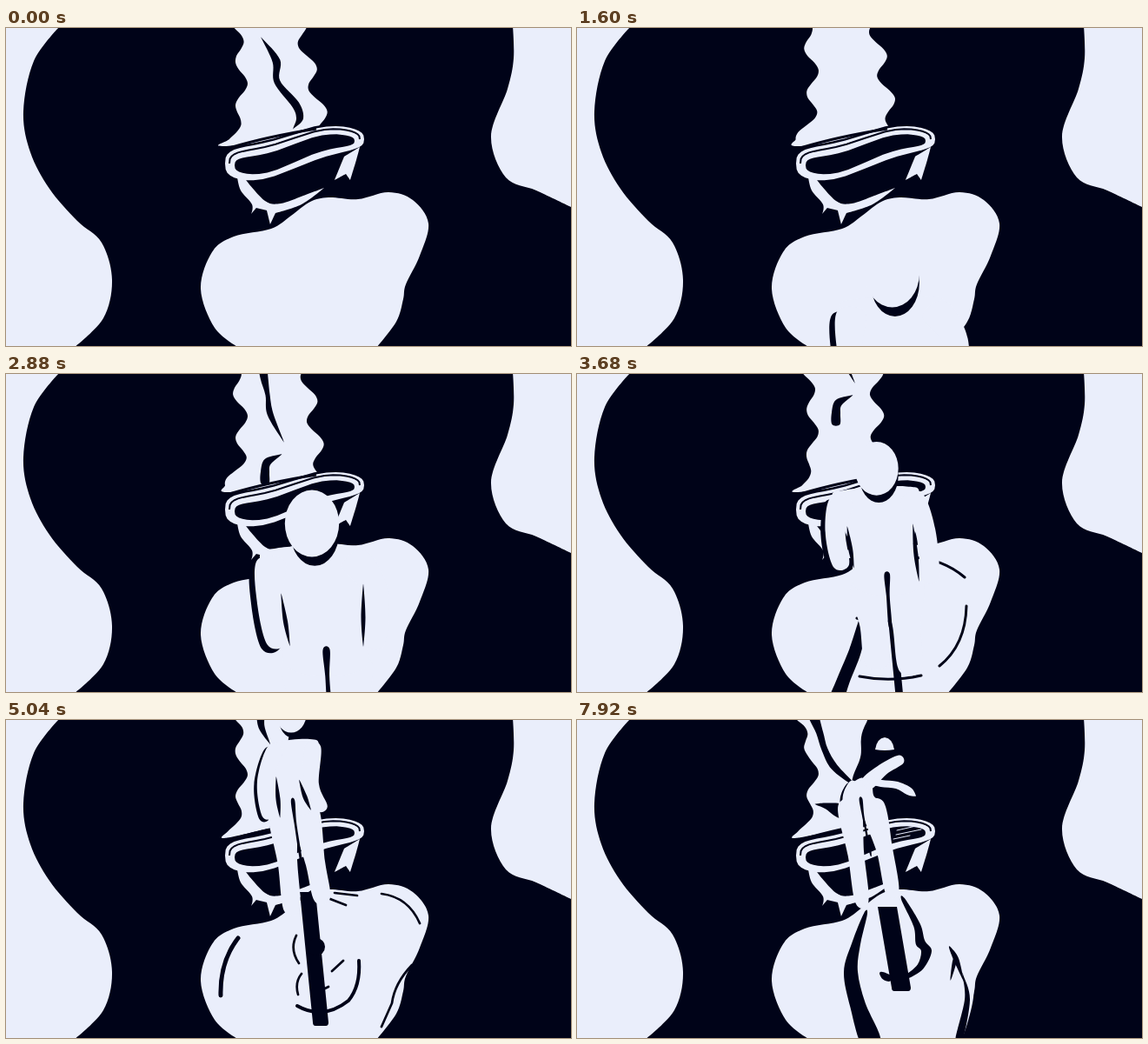
An HTML page that plays this animation: 650x366 px, repeating every 8 s.

```html
<!DOCTYPE html>
<html lang="en">
<head>
<meta charset="utf-8">
<title>Steam</title>
<style>
html, body { margin: 0; width: 100%; height: 100%; overflow: hidden; background: #eaeefb; }
svg { display: block; width: 650px; height: 366px; }
</style>
</head>
<body>
<svg id="stage" viewBox="0 0 650 366"></svg>
<script>
const LIGHT = '#eaeefb', DARK = '#000318';
const LOOP = 8000, STEP = 80, RISE = 0.085, TURN = 5520;
const stage = document.getElementById('stage');
const parts = [];

const clamp = v => Math.max(0, Math.min(1, v));
const mix = (a, b, u) => a + (b - a) * u;
const smooth = u => (u = clamp(u), u * u * (3 - 2 * u));
// "x,y" smooth point, "x,y!" corner, "x,y,w" point of a ribbon with its width
const parse = text => text.trim().split(/\s+/).map(p => {
  const point = p.split(',').map(parseFloat);
  point.corner = p.endsWith('!');
  return point;
});

// values between timed keys, held outside them
function track(keys) {
  return t => {
    const i = keys.findIndex(k => k[0] > t);
    if (i < 0) return keys[keys.length - 1][1];
    if (i === 0) return keys[0][1];
    const [[t0, a], [t1, b]] = [keys[i - 1], keys[i]];
    return a.map((v, j) => mix(v, b[j], (t - t0) / (t1 - t0)));
  };
}

function spline(pts) {
  const n = pts.length, at = i => pts[(i + n) % n], r = v => v.toFixed(1);
  const handle = (i, s) => {
    const k = at(i).corner ? 0 : s / 6, [a, b] = [at(i - 1), at(i + 1)];
    return `${r(at(i)[0] + k * (b[0] - a[0]))} ${r(at(i)[1] + k * (b[1] - a[1]))}`;
  };
  let d = `M${r(pts[0][0])} ${r(pts[0][1])}`;
  for (let i = 0; i < n; i++) {
    d += `C${handle(i, 1)} ${handle(i + 1, -1)} ${r(at(i + 1)[0])} ${r(at(i + 1)[1])}`;
  }
  return d + 'Z';
}

function ribbon(pts, dx = 0, dy = 0) {
  const side = s => pts.map(([x, y, w], i) => {
    const a = pts[Math.max(i - 1, 0)], b = pts[Math.min(i + 1, pts.length - 1)];
    const vx = b[0] - a[0], vy = b[1] - a[1], k = s * w / 2 / (Math.hypot(vx, vy) || 1);
    return [x + dx - vy * k, y + dy + vx * k];
  });
  return spline([...side(1), ...side(-1).reverse()]);
}

function oval(x, y, rx, ry) {
  return `M${x - rx} ${y}a${rx} ${ry} 0 1 0 ${2 * rx} 0a${rx} ${ry} 0 1 0 ${-2 * rx} 0Z`;
}

function add(attrs) {
  const el = document.createElementNS('http://www.w3.org/2000/svg', 'path');
  for (const k in attrs) el.setAttribute(k, attrs[k]);
  stage.append(el);
  return el;
}
const still = (fill, text) => add({ fill, d: spline(parse(text)) });
function shape(fill, path, from = 0, to = LOOP) {
  parts.push({ el: add({ fill }), path, from, to });
}
function lines(d, width, from, to, stroke = DARK) {
  parts.push({ el: add({ d, fill: 'none', stroke, 'stroke-width': width, 'stroke-linecap': 'round' }), from, to });
}
// dark ribbon that drifts up with the steam, or stays if speed is 0
function wisp(text, at, from, to = LOOP, speed = RISE) {
  const pts = parse(text);
  shape(DARK, t => ribbon(pts, 0, speed * (at - t)), from, to);
}

still(DARK, `62,-2! 32,38 20,96 28,143 50,185 82,222 110,247 122,290 112,334 78,368!
  652,368! 652,207! 610,187 575,172 558,125 577,70 584,35 583,-2!`);

// steam: two edges with a rising wave
const steamShape = track([
  [0, [264, 339, 365]], [2880, [264, 346, 362]], [4000, [264, 344, 340]],
  [4400, [262, 340, 312]], [5040, [264, 332, 305]], [5600, [258, 333, 308]], [6320, [252, 333, 310]]
]);
shape(LIGHT, t => {
  const now = Math.min(t, 6320), [left, top, bottom] = steamShape(now);
  const wave = (y, peak) => Math.cos((y - peak + 0.04 * now) * Math.PI / 25);
  const calm = mix(8, 2, smooth((now - 4000) / 1000));
  const a = [], b = [];
  for (let y = -8; y <= 136; y += 8) {
    a.push([mix(left, 271, clamp(y / 40)) + 7 * wave(y, 14) - 13 * smooth((y - 90) / 40), y]);
    b.push([mix(top, bottom, clamp(y / 110)) + calm * wave(y, 45), Math.min(y, 124)]);
  }
  return spline([...a, ...b.reverse()]);
});
wisp('295,13,1 311,38,9 312,62,7 333,88,9 338,104,8 331,115,1', 0, 0, 1360);
wisp('294,-20,10 297,4,9 301,24,5 304,46,7 318,75,1', 2880, 2080, 3900);
wisp('316,93,1 301,101,9 298,113,10 298,126,9', 2880, 2320, 3700);
wisp('293,-10,8 294,8,7 303,26,1', 5040, 4640, TURN);
wisp('270,-10,11 279,14,8 285,34,7 296,54,8 317,73,3', 0, TURN, LOOP, 0);
wisp('275,97,1 287,99,7 299,103,15 302,112,3', 0, 5760, LOOP, 0);

still(LIGHT, `268,368! 240,345 224,300 237,258 262,240 305,231 328,216 350,200 371,195 405,197
  440,189 468,198 486,225 476,262 460,295 457,312 449,338 426,368!`);

// tub rim: sheared superellipse
function rim(halfWidth, height, dy = 0, turns = 1) {
  const root = v => Math.sign(v) * Math.abs(v) ** (2 / 3), pts = [];
  for (let i = 0; i <= 40 * turns; i++) {
    const a = Math.PI + i * Math.PI / 20, c = root(Math.cos(a)), s = root(Math.sin(a));
    const y = 142 + dy - 14 * c - 5 * Math.sin(Math.PI * c) + (height - height / 5 * c) * s;
    pts.push(`${(332 + halfWidth * c).toFixed(1)} ${y.toFixed(1)}`);
  }
  return 'M' + pts.join('L');
}
add({ d: rim(80, 19.5), fill: LIGHT, stroke: DARK, 'stroke-width': 5, 'paint-order': 'stroke' });
add({ d: rim(69, 10.5, 2), fill: DARK });
add({ d: rim(75, 15.5, 0, 0.5), fill: 'none', stroke: DARK, 'stroke-width': 2 });
add({ d: 'M257 138Q300 125 357 116', fill: 'none', stroke: DARK, 'stroke-width': 3 });
still(LIGHT, `266,171! 270,187 283,203 282,214! 288,207! 300,210! 304,226! 310,213! 340,203 366,184!
  342,193 316,202 298,199 276,175!`);
still(LIGHT, '407,137! 403,152 396,175! 391,168! 378,175! 389,148!');
lines('M368 127L390 122M367 132L396 126M364 137L383 133', 1, 5920, LOOP, LIGHT);

// reflections on the pool
lines('M246 259Q238 270 236 286M237 308Q246 333 262 348M279 240Q296 233 313 232', 2.2, 3760, 4720);
lines('M384 211Q420 212 446 234M448 267Q447 312 417 336M325 348Q360 355 396 347M322 281Q338 287 357 284', 3, 3680, 4720);
wisp('332,248,9 320,290,14 306,325,15 289,372,17', 4400, 3520, 4720, 0.04);
wisp('386,250,3 397,276,9 414,312,9 429,345,6', 4400, 3760, 4720, 0.05);
lines('M433 351v.1', 6, 4160, 4720);
lines('M267 251Q246 278 247 317', 5, 4720, TURN);
lines('M335 329Q365 346 394 323Q408 306 406 277', 4, 4720, 5600);
lines(`M334 248Q326 264 337 280M340 292Q332 302 336 316M361 312L371 307M375 289L388 277
  M373 206L391 213M378 199L404 202M432 200Q463 204 476 234M467 282Q447 303 444 326L432 353`, 2.7, 4720, 5600);

// central shadow: top, bottom, width
const shadow = track([
  [2880, [366, 328, 378, 385, 4]], [4400, [359, 240, 365, 370, 13]], [5040, [347, 198, 362, 352, 18]],
  [6320, [348, 204, 358, 311, 23]], [7040, [357, 215, 373, 312, 22]]
]);
shape(DARK, t => {
  const [x0, y0, x1, y1, w] = shadow(t), h = w / 2;
  return `M${x0 - h} ${y0}H${x0 + h}L${x1 + h} ${y1 - 4}Q${x1 + h} ${y1} ${x1 + h - 3} ${y1}H${x1 - h + 3}Q${x1 - h} ${y1} ${x1 - h} ${y1 - 4}Z`;
}, 2880);
lines('M357 261v.1', 20, 4800, 5600);

// grasping hand, sliding right as one piece
const reach = t => 11 * clamp((t - 6320) / 720);
for (const [fill, text] of [
  [LIGHT, '434,300,18 436,325,16 422,372,14'],
  [DARK, '321,223,4 310,258,10 304,290,16 312,328,18 328,372,22'],
  [DARK, '364,206,4 380,236,8 384,256,11 391,266,12 384,284,8 368,296,4'],
  [DARK, '338,291,3 343,295,8 350,298,6'],
  [DARK, '418,262,2 425,275,6 433,298,1'],
  [DARK, '424,275,4 422,284,4 419,298,1'],
  [DARK, '433,294,1 438,322,6 428,370,8']
]) {
  const pts = parse(text);
  shape(fill, t => ribbon(pts, reach(t)), 5600);
}

// figure: scale, then joints in the order of NAMES
const NAMES = ['head', 'shoulderL', 'shoulderR', 'elbowL', 'elbowR', 'handL', 'handR',
  'hipL', 'hipR', 'kneeL', 'kneeR', 'footL', 'footR'];
const pose = (scale, text) => [scale, ...parse(text).flat()];
const emerged = pose(1.6, '352,172 305,215 400,212 303,260 425,250 312,310 425,310 345,330 392,330 350,390 395,390 350,440 395,440');
const sunken = emerged.map((v, i) => i === 0 ? v : v + (i % 2 ? 24 : 250));
const figure = track([
  [0, sunken],
  [2880, emerged],
  [4400, pose(1, '338,52 303,82 370,77 292,112 379,118 297,141 391,168 331,160 361,160 334,200 365,200 341,240 374,252')],
  [5040, pose(0.9, '328,-7 310,33 353,30 297,72 352,75 301,110 364,102 317,100 343,100 324,165 356,165 329,219 364,207')],
  [6160, pose(0.75, '328,-120 322,74 333,74 313,86 352,57 312,98 373,45 313,97 340,97 321,155 354,150 328,210 363,199')]
]);
function body(t) {
  const values = figure(t), joints = { s: values[0] };
  NAMES.forEach((name, i) => joints[name] = [values[2 * i + 1], values[2 * i + 2]]);
  return joints;
}
const limb = (b, side, widths) =>
  Object.entries(widths).map(([name, w]) => [...b[name + side], w * b.s]);
const arm = (b, side) => limb(b, side, { shoulder: 20, elbow: 18, hand: 14 });
const leg = (b, side) => limb(b, side, { hip: 34, knee: 25, foot: 20 });

function torso({ s, shoulderL: a, shoulderR: b, hipL: c, hipR: d }) {
  const off = ([x, y], dx, dy) => [x + dx * s, y + dy * s];
  const waist = (p, q, dx) => [mix(p[0], q[0], 0.6) + dx * s, mix(p[1], q[1], 0.6)];
  return spline([off(a, -8, 0), off(a, 4, -9), off(b, -4, -9), off(b, 8, 0), waist(b, d, 6),
    off(d, 16, 0), off(d, 0, 10), off(c, 0, 10), off(c, -16, 0), waist(a, c, -6)]);
}
function armGap(b, side) {
  const inward = side === 'L' ? 14 : -14, [x0, y0] = b['elbow' + side], [x1, y1] = b['hand' + side];
  return ribbon([[x0 + inward, y0 - 4, 1], [mix(x0, x1, 0.5) + inward, mix(y0, y1, 0.5), 5], [x1 + inward, y1, 1]]);
}

shape(DARK, t => { const b = body(t); return ribbon(arm(b, 'L'), -4 * b.s, 3 * b.s); });
for (const side of ['L', 'R']) shape(LIGHT, t => ribbon(leg(body(t), side)));
shape(LIGHT, t => torso(body(t)));
for (const side of ['L', 'R']) shape(LIGHT, t => ribbon(arm(body(t), side)));
for (const side of ['L', 'R']) shape(DARK, t => armGap(body(t), side), 2000, TURN);
shape(DARK, t => {
  const { s, hipL, hipR, kneeL, kneeR } = body(t);
  const mid = (p, q) => [(p[0] + q[0]) / 2, (p[1] + q[1]) / 2];
  const [x0, y0] = mid(hipL, hipR), [x1, y1] = mid(kneeL, kneeR);
  return ribbon([[x0, y0 - 8 * s, 5 * s], [mix(x0, x1, 0.3), mix(y0, y1, 0.3), 3 * s], [x1, y1, 3 * s]]);
}, 2880);
shape(DARK, t => {
  const { s, head: [x, y] } = body(t);
  return oval(x + 2 * s, y + 6.5 * s, 17.5 * s, 24 * s);
}, 0, TURN);
shape(LIGHT, t => {
  const { s, head: [x, y] } = body(t);
  return oval(x, y, 19.5 * s, 24 * s);
}, 0, TURN);

// second arm and head of the turned figure
shape(LIGHT, () => ribbon(parse('336,69,8 350,73,8 368,75,8 382,82,9 389,87,2')), 5760);
shape(LIGHT, () => 'M343 34Q345 21 354 20Q363 21 365 34Q354 36 343 34Z', 5760);

function draw(now) {
  const t = Math.floor((now % LOOP) / STEP) * STEP;
  for (const { el, path, from, to } of parts) {
    const shown = t >= from && t < to;
    el.style.display = shown ? '' : 'none';
    if (shown && path) el.setAttribute('d', path(t));
  }
}

const start = performance.now();
function tick() {
  draw(performance.now() - start);
  requestAnimationFrame(tick);
}
tick();
</script>
</body>
</html>
```
